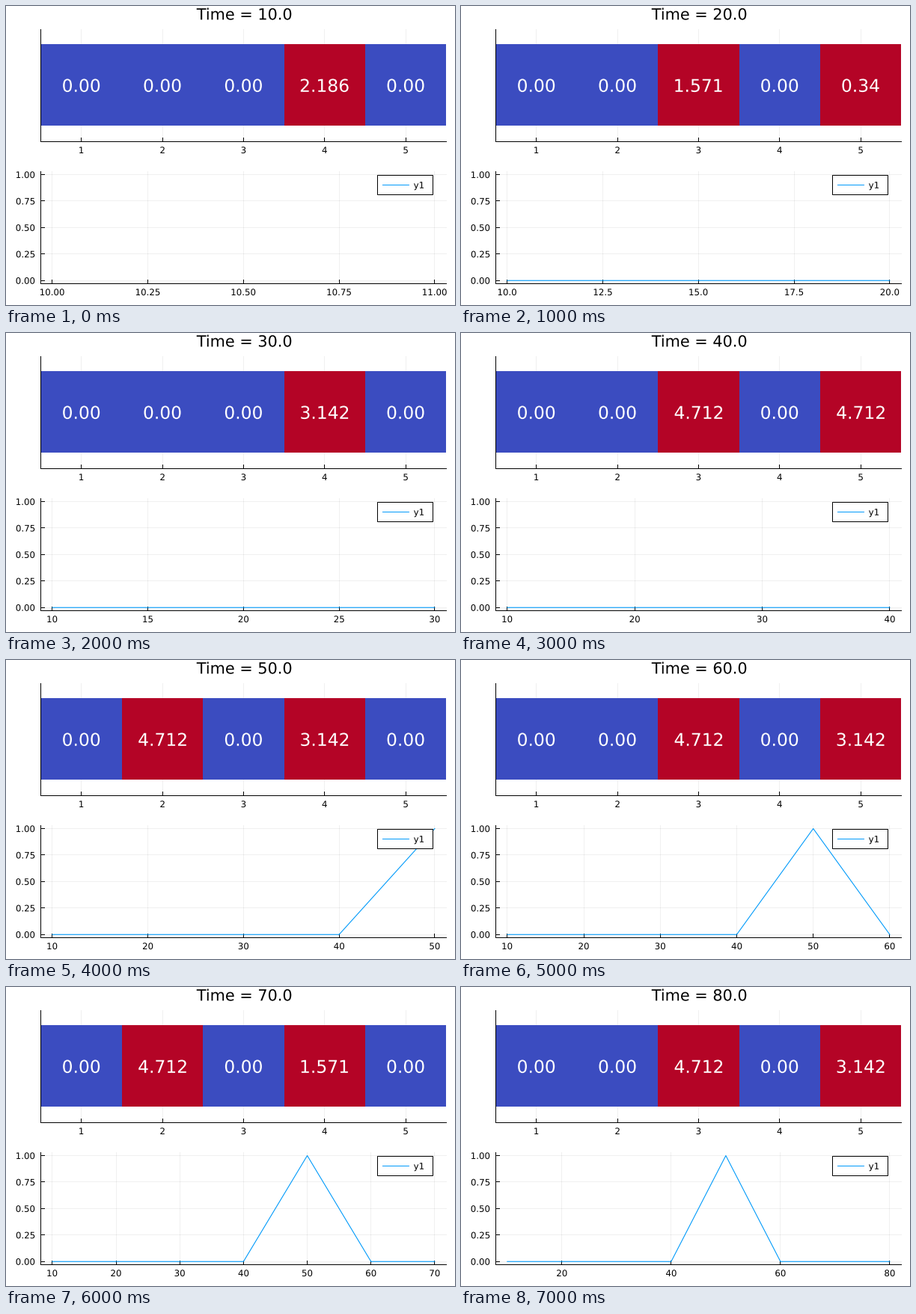
Animation of 600 by 400 pixels, one loop 8 s. Source, as a matplotlib script:

```python
import matplotlib.pyplot as plt
import numpy as np
from matplotlib.animation import FuncAnimation
from matplotlib.patches import PathPatch, Rectangle
from matplotlib.textpath import TextPath
from matplotlib.transforms import Affine2D

PT = 0.72  # points per pixel at 100 dpi
BLUE, RED, LINE = "#3B4CC0", "#B40426", "#009AFA"
LEFT, RIGHT = 46.5, 588.25
TOP_BASE, LOW_TOP, LOW_BASE = 181.5, 221.5, 371.5
CELL = (RIGHT - LEFT) / 5
TICK_SIZE, CELL_SIZE, TITLE_SIZE = 11.8, 23.4, 20.8

plt.rcParams["font.family"] = "DejaVu Sans"

# occupied cells and their phase, one entry per time step
STATES = [
    {4: "2.186"},
    {3: "1.571", 5: "0.34"},
    {4: "3.142"},
    {3: "4.712", 5: "4.712"},
    {2: "4.712", 4: "3.142"},
    {3: "4.712", 5: "3.142"},
    {2: "4.712", 4: "1.571"},
    {3: "4.712", 5: "3.142"},
]

fig = plt.figure(figsize=(6, 4), dpi=100, facecolor="white")
ax = fig.add_axes([0, 0, 1, 1])


def crisp(xs, ys, color="black", z=3, **kw):
    """A one pixel line that fills whole pixels."""
    ax.plot(np.floor(xs), np.floor(ys), color=color, lw=PT, zorder=z,
            snap=True, **kw)


def grid(xs, ys):
    crisp(xs, ys, alpha=0.06, z=0)


def text(x, y, s, size, color="black", align=0.5):
    """Outlined text, so that it can sit between whole pixels."""
    path = TextPath((0, 0), s, size=size)
    box = path.get_extents()
    place = Affine2D().translate(-box.x0 - align * box.width, 0)
    place.scale(1, -1).translate(x, y)
    ax.add_patch(PathPatch(place.transform_path(path), fc=color, lw=0,
                           zorder=6))


def x_axis(base, top, xs, labels):
    crisp([LEFT, RIGHT], [base, base])
    crisp([LEFT, LEFT], [base, top])
    for x, label in zip(xs, labels):
        grid([x, x], [base, top])
        crisp([x, x], [base, base - 5])
        text(x, base + 15.5, label, TICK_SIZE)


def draw_cells(state):
    centers = LEFT + CELL * (np.arange(5) + 0.5)
    x_axis(TOP_BASE, 31, centers, "12345")
    for i, x in enumerate(centers, 1):
        ax.add_patch(Rectangle((x - CELL / 2, 51), CELL, 109, lw=0, zorder=2,
                               snap=True, fc=RED if i in state else BLUE))
        text(x, 114.8, state.get(i, "0.00"), CELL_SIZE, "white")


def time_ticks(end):
    if end == 10:
        return np.linspace(10, 11, 5), "%.2f"
    if end == 20:
        return np.linspace(10, 20, 5), "%.1f"
    if end == 30:
        return np.arange(10, 31, 5), "%d"
    if end < 80:
        return np.arange(10, end + 1, 10), "%d"
    return np.arange(20, 81, 20), "%d"


def draw_series(end):
    span = max(end, 11) - 10
    pad = (RIGHT - LEFT) * 0.03 / 1.06

    def px(t):
        return LEFT + pad + (np.asarray(t) - 10) / span * (RIGHT - LEFT - 2 * pad)

    def py(v):
        return 367.25 - 141.7 * np.asarray(v)

    ticks, fmt = time_ticks(end)
    x_axis(LOW_BASE, LOW_TOP, px(ticks), [fmt % t for t in ticks])
    for v in np.linspace(0, 1, 5):
        y = py(v)
        grid([LEFT, RIGHT], [y, y])
        crisp([LEFT, LEFT + 5], [y, y])
        text(38.2, y + 4.5, f"{v:.2f}", TICK_SIZE, align=1)

    if end > 10:
        t = np.arange(10, end + 1, 10)
        ax.plot(px(t), py(t == 50), color=LINE, lw=1.1 * PT, zorder=3,
                snap=False)


def draw_legend():
    ax.add_patch(Rectangle((496, 226), 74, 26, fc="white", ec="black",
                           lw=PT, zorder=4, snap=True))
    crisp([503, 538.5], [239, 239], LINE, z=5)
    text(545, 243.8, "y1", TICK_SIZE, align=0)


def draw(step):
    ax.clear()
    ax.set(xlim=(0, 600), ylim=(400, 0))
    ax.axis("off")
    end = 10 * (step + 1)
    text(318, 18.3, f"Time = {end:.1f}", TITLE_SIZE)
    draw_cells(STATES[step])
    draw_series(end)
    draw_legend()
    return []


anim = FuncAnimation(fig, draw, frames=len(STATES), interval=1000,
                     init_func=lambda: [], repeat=True, repeat_delay=0)
plt.show()
```
